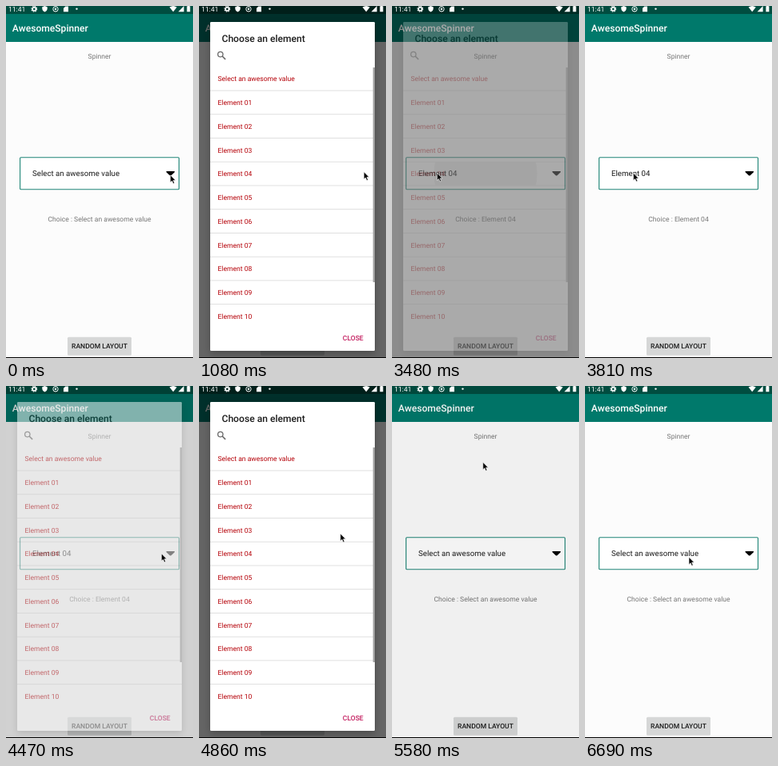
Write an HTML page that moves like this. It is 234 px wide and 441 px high and loops after 6.75 s.

```html
<!DOCTYPE html>
<html lang="en">
<head>
<meta charset="utf-8">
<title>Spinner dialog</title>
<style>
  html, body { margin: 0; width: 100%; height: 100%; overflow: hidden; background: #fcfcfc; }
  svg { display: block; width: 100vw; height: 100vh; }
  text { font-family: Roboto, sans-serif; font-size: 8.57px; text-rendering: geometricPrecision; }
  .bold { font-weight: 500; }
  .title { font-weight: 500; font-size: 12.1px; }
  .muted { fill: #757575; }
  .mid { text-anchor: middle; }
  .row { fill: #b50008; }
</style>
</head>
<body>
<svg viewBox="0 0 234 441">
  <defs>
    <clipPath id="listClip"><rect x="14" y="76" width="206" height="326"/></clipPath>
    <clipPath id="rowClip"><rect id="rowBox" x="14" width="206" height="28.6"/></clipPath>
    <filter id="soft" x="-10%" y="-10%" width="120%" height="120%"><feGaussianBlur stdDeviation="4"/></filter>
  </defs>

  <rect width="234" height="441" fill="#fcfcfc"/>
  <rect width="234" height="45" fill="#00796b"/>
  <rect width="234" height="10" fill="#004d40"/>
  <text class="title" x="7.8" y="32.3" fill="#fff">AwesomeSpinner</text>
  <text class="muted mid" x="117" y="66">Spinner</text>
  <rect x="17.6" y="189.7" width="198.9" height="40" rx="1" fill="#fff" stroke="#1f8577" stroke-width="1.1"/>
  <text id="value" x="33" y="213.1" style="font-size:9.7px" fill="#1c1c1c"></text>
  <path d="M201 207h9.6q1 .4 .3 1.2l-4.2 4q-.9 .6-1.8 0l-4.2-4q-.7-.8 .3-1.2z" fill="#000"/>
  <text id="choice" class="muted mid" x="117" y="270"></text>
  <rect x="77" y="415.6" width="80" height="22.2" rx="1.5" fill="#000" opacity=".15"/>
  <rect x="77" y="414.8" width="80" height="22.2" rx="1.5" fill="#d6d7d7"/>
  <text class="bold mid" x="117" y="429" fill="#1c1c1c">RANDOM LAYOUT</text>

  <rect id="dim" width="234" height="441"/>

  <g id="dialog">
    <rect x="14" y="23" width="206" height="412" opacity=".25" filter="url(#soft)"/>
    <rect x="14" y="20" width="206" height="412" rx="1.2" fill="#fff"/>
    <text class="title" x="28.5" y="44.5" fill="#1c1c1c">Choose an element</text>
    <g fill="none" stroke="#6a6a6a" stroke-width="1.3">
      <circle cx="26.8" cy="60.6" r="3.2"/>
      <path d="M29.2 63l3.9 3.9" stroke-width="1.6"/>
    </g>
    <g id="rows" clip-path="url(#listClip)"></g>
    <g clip-path="url(#rowClip)"><circle id="ripple" cx="117" opacity=".1"/></g>
    <rect x="217.7" y="77" width="2.3" height="269" fill="#a3a3a3"/>
    <text class="bold" x="179.8" y="418.8" fill="#c2185b">CLOSE</text>
  </g>

  <rect y="440" width="234" height="1"/>
  <g fill="#fff">
    <text x="3" y="6.9" fill="#fff">11:41</text>
    <circle cx="35.3" cy="3.8" r="2.2" fill="none" stroke="#fff" stroke-width="1.7"/>
    <circle cx="35.3" cy="3.8" r="3.4" fill="none" stroke="#fff" stroke-width="1.1" stroke-dasharray="1.4 1.27"/>
    <path d="M48.5 0l3.2 1.2v2.6q-.3 2.7-3.2 3.8q-2.9-1.1-3.2-3.8v-2.6z"/>
    <circle cx="62" cy="3.8" r="3.2" fill="none" stroke="#fff"/>
    <circle cx="62" cy="3.8" r="1.3"/>
    <path d="M74.4 .4h3.6v6.8h-6v-4.5z"/>
    <circle cx="88.5" cy="3.6" r="1.2"/>
    <path d="M204.6 1.6q4.6-3 9.2 0l-4.6 5.6z"/>
    <path d="M222.6 0v7.2h-7z"/>
    <path d="M226.4 .3h1v-.8h2v.8h1v7h-4z"/>
  </g>

  <path id="cursor" d="M0 0v9.3l2.1-2l1.5 3.5l1.6-.7l-1.5-3.4h2.9z" fill="#000" stroke="#fff" stroke-width=".6"/>
</svg>
<script>
const LOOP = 6750, PITCH = 29.74, DEFAULT = 'Select an awesome value';
const $ = id => document.getElementById(id);
const clamp = v => Math.min(1, Math.max(0, v));
const ease = p => p * p * (3 - 2 * p);

const items = [DEFAULT];
for (let i = 1; i <= 10; i++) items.push('Element ' + String(i).padStart(2, '0'));
$('rows').innerHTML = items.map((label, i) => `
  <text class="row" x="23.5" y="${94.4 + i * PITCH}">${label}</text>
  <rect x="14" y="${105.6 + i * PITCH}" width="206" height=".8" fill="#d8d8d8"/>`).join('');

// Each session: dialog appears, an item is picked, dialog fades away.
const sessions = [
  { open: 990, pick: 3370, item: 4 },
  { open: 4470, pick: 5370, item: 0 }
];

// [start, end, x, y] of each pointer move
const moves = [
  [120, 540, 206.3, 207.8],
  [1440, 2310, 56.4, 209.2],
  [3750, 4340, 194.5, 210],
  [4680, 5280, 113.8, 95.5],
  [5830, 6500, 130, 214.4]
];

function pointer(t) {
  let x = 205.6, y = 211.8;
  for (const [start, end, tx, ty] of moves) {
    const p = ease(clamp((t - start) / (end - start)));
    x += (tx - x) * p;
    y += (ty - y) * p;
  }
  return [x, y];
}

function render(t) {
  const s = sessions.findLast(s => t >= s.open);
  let alpha = 0, dim = 0, radius = 0, label = DEFAULT;
  if (s) {
    const lead = t - s.open + 75, gone = t - s.pick;
    alpha = clamp(lead / 150) * (1 - clamp(gone / 150));
    dim = 0.6 * clamp(lead / 165) ** 1.6 * (1 - clamp(gone / 220) ** 2);
    radius = 104 * clamp((gone + 150) / 420);
    const previous = s === sessions[1] ? sessions[0].item : 0;
    label = items[gone >= 0 ? s.item : previous];
    const top = 76.8 + s.item * PITCH;
    $('rowBox').setAttribute('y', top);
    $('ripple').setAttribute('cy', top + 14.3);
  }
  $('ripple').setAttribute('r', radius);
  $('dialog').setAttribute('opacity', alpha);
  $('dim').setAttribute('opacity', dim);
  $('value').textContent = label;
  $('choice').textContent = 'Choice : ' + label;
  $('cursor').setAttribute('transform', `translate(${pointer(t)})`);
}

const begin = performance.now();
function tick() {
  render((performance.now() - begin) % LOOP);
  requestAnimationFrame(tick);
}
tick();
</script>
</body>
</html>
```
